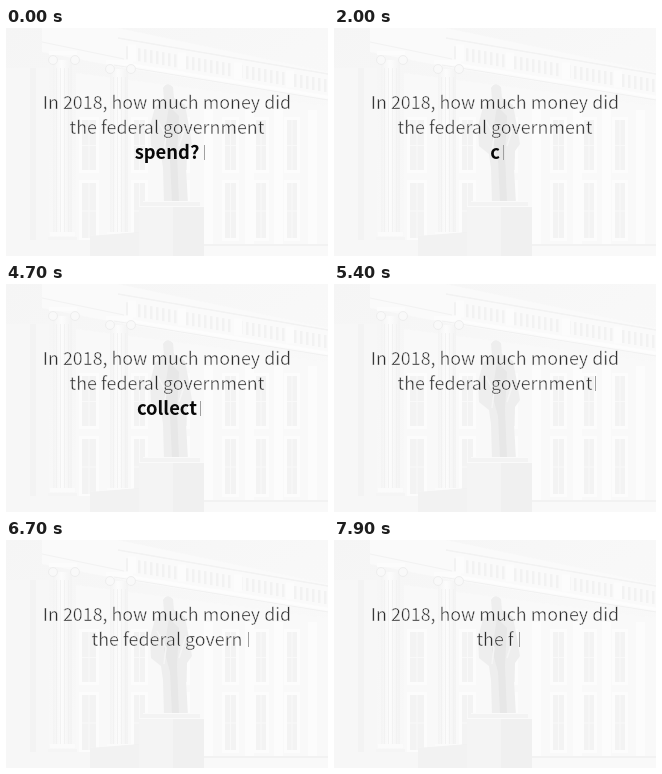
These frames come from a looping animation (322x228 px, 8 s). An HTML page:

```html
<!DOCTYPE html>
<html lang="en">
<head>
<meta charset="utf-8">
<style>
html, body { margin: 0; width: 100%; height: 100%; overflow: hidden; background: #f8f8f8; }
svg { display: block; width: 322px; height: 228px; }
/* A pale outline thins the regular weight to a light one. */
text { font: 300 17.85px "Noto Sans CJK JP", "Noto Sans CJK SC", "Noto Sans", sans-serif; text-anchor: middle; fill: #2c2c2c; stroke: #f8f8f8; stroke-width: .5px; }
#word { font-weight: 700; font-size: 18.4px; fill: #080808; stroke: none; }
</style>
</head>
<body>
<svg viewBox="0 0 322 228">
  <defs>
    <linearGradient id="sky" x2="1" y2="1">
      <stop offset="0" stop-color="#f5f5f5"/>
      <stop offset=".5" stop-color="#f8f8f8"/>
      <stop offset="1" stop-color="#f9f9f9"/>
    </linearGradient>
    <linearGradient id="stone">
      <stop offset="0" stop-color="#f4f4f4"/>
      <stop offset=".45" stop-color="#fcfcfc"/>
      <stop offset="1" stop-color="#f3f3f3"/>
    </linearGradient>
  </defs>
  <rect width="322" height="228" fill="url(#sky)"/>
  <g id="scene"></g>
  <text x="161" y="81">In 2018, how much money did</text>
  <text x="161" y="106" id="line"></text>
  <text x="161" y="131" id="word"></text>
  <rect id="caret" width="1" height="15" fill="#a0a0a0"/>
</svg>
<script>
const $ = id => document.getElementById(id);
const scene = $('scene');

function add(tag, attrs) {
  const el = document.createElementNS('http://www.w3.org/2000/svg', tag);
  for (const k in attrs) el.setAttribute(k, attrs[k]);
  scene.append(el);
}
const box = (x, y, width, height, fill) => add('rect', { x, y, width, height, fill });
const shape = (d, fill) => add('path', { d, fill });
const stroke = (d, color, w = 1) => add('path', { d, fill: 'none', stroke: color, 'stroke-width': w });

function column(x, top, w) {
  box(x, top, w, 206 - top, 'url(#stone)');
  for (let i = 3; i < w - 1; i += 4) box(x + i, top + 8, 1, 196 - top, '#f2f2f2');
  box(x - 4, top - 9, w + 9, 4, '#fcfcfc');
  for (const cx of [x, x + w + 3]) {
    add('circle', { cx, cy: top, r: 4.5, fill: '#f9f9f9', stroke: '#eeeeee' });
  }
  box(x - 3, 204, w + 6, 4, '#fbfbfb');
  box(x - 5, 209, w + 10, 7, '#f5f5f5');
}

function pane(x, y, w, h) {
  box(x - 3, y - 3, w + 6, h + 6, '#fcfcfc');
  box(x, y, w, h, '#f3f3f3');
  box(x + w / 2 - .5, y, 1, h, '#f9f9f9');
  box(x, y + h / 2, w, 1, '#f9f9f9');
}

function building() {
  shape('M36 0H112L322 44V72L118 40L36 24Z', '#fafafa');
  shape('M70 45L322 78V228H70Z', '#f9f9f9');
  shape('M0 40H43V228H0Z', '#f7f7f7');
  box(24, 40, 6, 172, '#f3f3f3');
  stroke('M112 10L322 46', '#f2f2f2', 1.5);
  for (let x = 120; x < 320; x += 6) {
    box(x, 17 + (x - 112) * .165, 2.5, 13, '#f2f2f2');
  }
  for (const x of [122, 172, 228, 280]) box(x, 15 + (x - 112) * .165, 8, 17, '#fcfcfc');
  stroke('M108 34L322 69', '#fdfdfd', 3);
  stroke('M108 37L322 72', '#f1f1f1');
  stroke('M36 14L118 31', '#f2f2f2');
  for (const [x, w] of [[76, 14], [128, 11], [168, 13], [219, 11], [250, 10], [281, 10]]) {
    pane(x, 92, w, 50);
    pane(x, 155, w, 55);
  }
  for (const x of [198, 239, 268, 302]) box(x, 82, 9, 134, '#fcfcfc');
  box(70, 216, 252, 2, '#f2f2f2');
  column(47, 32, 19);
  column(104, 41, 18);
  shape('M0 212H92V228H0Z', '#f7f7f7');
  shape('M84 208L133 204V228H84Z', '#f2f2f2');
}

function statue() {
  shape('M157 60Q161 53 167 59L168 70L179 77L183 98L186 116L181 123L180 140L182 176H158L157 140L155 126L145 118L144 98L149 79L158 71Z', '#eeeeee');
  shape('M163 78L173 88L171 126L173 174H166L164 132L158 110Z', '#e7e7e7');
  stroke('M151 91L160 108L158 124M180 96L173 118', '#f5f5f5', 1.5);
  box(137, 173, 57, 5, '#f3f3f3');
  box(133, 178, 65, 50, '#f0f0f0');
  box(133, 178, 34, 50, '#f4f4f4');
  stroke('M133 178.5H198M137 173.5H194', '#fafafa');
}

building();
statue();

// Each run changes one character every 100 ms.
const HEAD = 'the federal government';
const steps = [[0, HEAD, 'spend?', 6]];
function run(start, count, gap, make) {
  for (let i = 1; i <= count; i++) steps.push([start + (i - 1) * 100, ...make(i), gap]);
}
run(500, 6, 4, n => [HEAD, 'spend?'.slice(0, 6 - n)]);
run(2000, 8, 4.5, n => [HEAD, 'collect?'.slice(0, n)]);
run(4700, 8, 4, n => [HEAD, 'collect?'.slice(0, 8 - n)]);
run(6400, 9, 7, n => [HEAD.slice(0, -n), '']);
run(7300, 7, 6, n => ['the federal'.slice(0, 12 - n), '']);

let last;
function frame(now) {
  const step = steps.findLast(s => s[0] <= now % 8000);
  if (step !== last) {
    last = step;
    const [, line, word, gap] = step;
    $('line').textContent = line;
    $('word').textContent = word;
    const width = $(word ? 'word' : 'line').getComputedTextLength();
    $('caret').setAttribute('x', Math.round(160.5 + width / 2 + gap - .5));
    $('caret').setAttribute('y', word ? 117 : 92);
  }
  requestAnimationFrame(frame);
}
frame(0);
</script>
</body>
</html>
```
